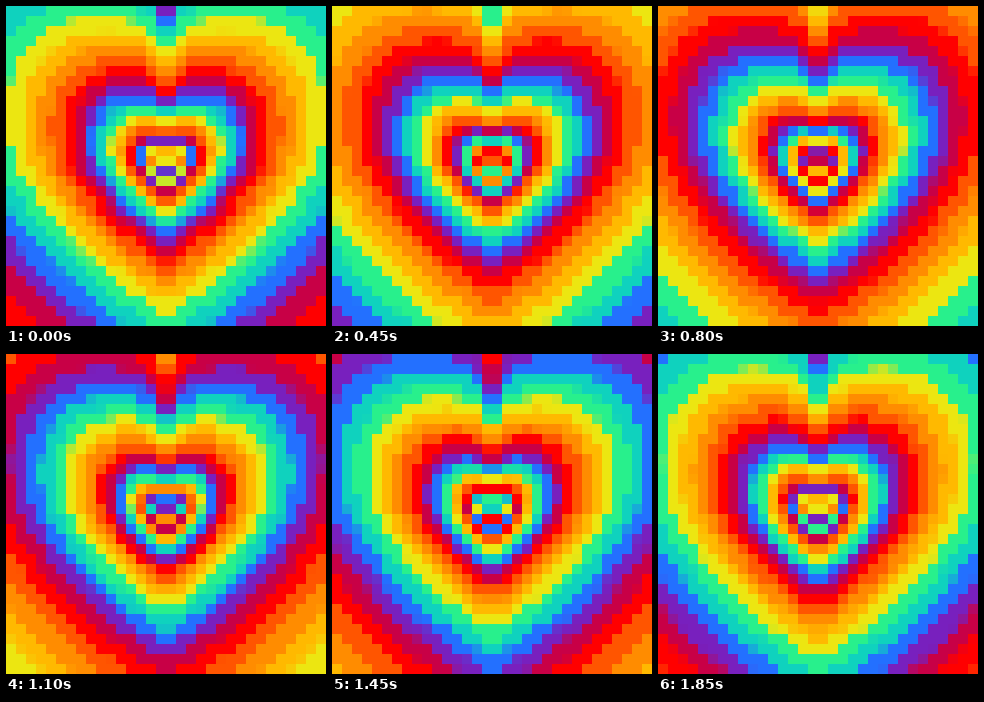
These frames come from a looping animation (320 px wide and 320 px high, 1900 ms). An HTML page with a canvas:

```html
<!DOCTYPE html>
<html lang="en">
<head>
<meta charset="utf-8">
<title>Rainbow heart tunnel</title>
<style>
  html, body { margin: 0; width: 100%; height: 100%; overflow: hidden; background: #ff0000; }
  canvas { display: block; width: 320px; height: 320px; }
</style>
</head>
<body>
<canvas id="stage" width="320" height="320"></canvas>
<script>
const LOOP = 1900, TICK = 50;
const CELL = 10, SIZE = 32, MID = SIZE * CELL / 2;
const RADIUS = 155;    // size of the yellow ring at time zero
const BAND = 0.105;    // log thickness of one colour band
const BLEND = 0.1;     // soft share of a band edge

const COLORS = {
  red: "#ff0000", crimson: "#c80046", purple: "#7820be", blue: "#2370ff", teal: "#0fd2be",
  green: "#28f08c", yellow: "#ece611", amber: "#ffb900", orange: "#ff8c00", vermilion: "#ff5500"
};
const PALETTE = Object.values(COLORS);
const YELLOW = PALETTE.indexOf(COLORS.yellow);

// size of the heart through (x, y): a tilted ellipse mirrored at x = 0,
// with a notch that sharpens towards the upper axis
function heartSize(x, y) {
  const r = Math.hypot(x, y);
  const side = Math.abs(x) / r, up = y / r;
  const tilt = up > 0 ? 0.85 : 1.3;
  const notch = up > 0 ? 0.065 * up ** 2 / side ** 0.8 : 0;
  return r * Math.sqrt(1.2 - tilt * side * up + notch);
}

// band number at time zero, falling outwards
function depth(col, row) {
  const x = (col + 0.5) * CELL - MID;
  const y = MID - (row + 0.5) * CELL;
  return YELLOW - Math.log(heartSize(x, y) / RADIUS) / BAND;
}

const ctx = document.getElementById("stage").getContext("2d");

function fillCell(col, row, band, alpha) {
  const n = PALETTE.length;
  ctx.globalAlpha = alpha;
  ctx.fillStyle = PALETTE[((band % n) + n) % n];
  ctx.fillRect(col * CELL, row * CELL, CELL, CELL);
}

function draw(ms) {
  const shift = ms / LOOP * PALETTE.length;
  for (let row = 0; row < SIZE; row++) {
    for (let col = 0; col < SIZE; col++) {
      const band = depth(col, row) + shift;
      const low = Math.floor(band);
      const mix = (band - low - 0.5) / BLEND + 0.5;
      fillCell(col, row, low, 1);
      if (mix > 0) fillCell(col, row, low + 1, Math.min(1, mix));
    }
  }
}

const start = performance.now();
let shown = 0;

function frame() {
  const ms = Math.max(0, performance.now() - start) % LOOP;
  const tick = Math.floor(ms / TICK);
  if (tick !== shown) draw(tick * TICK);
  shown = tick;
  requestAnimationFrame(frame);
}

draw(0);
requestAnimationFrame(frame);
</script>
</body>
</html>
```
